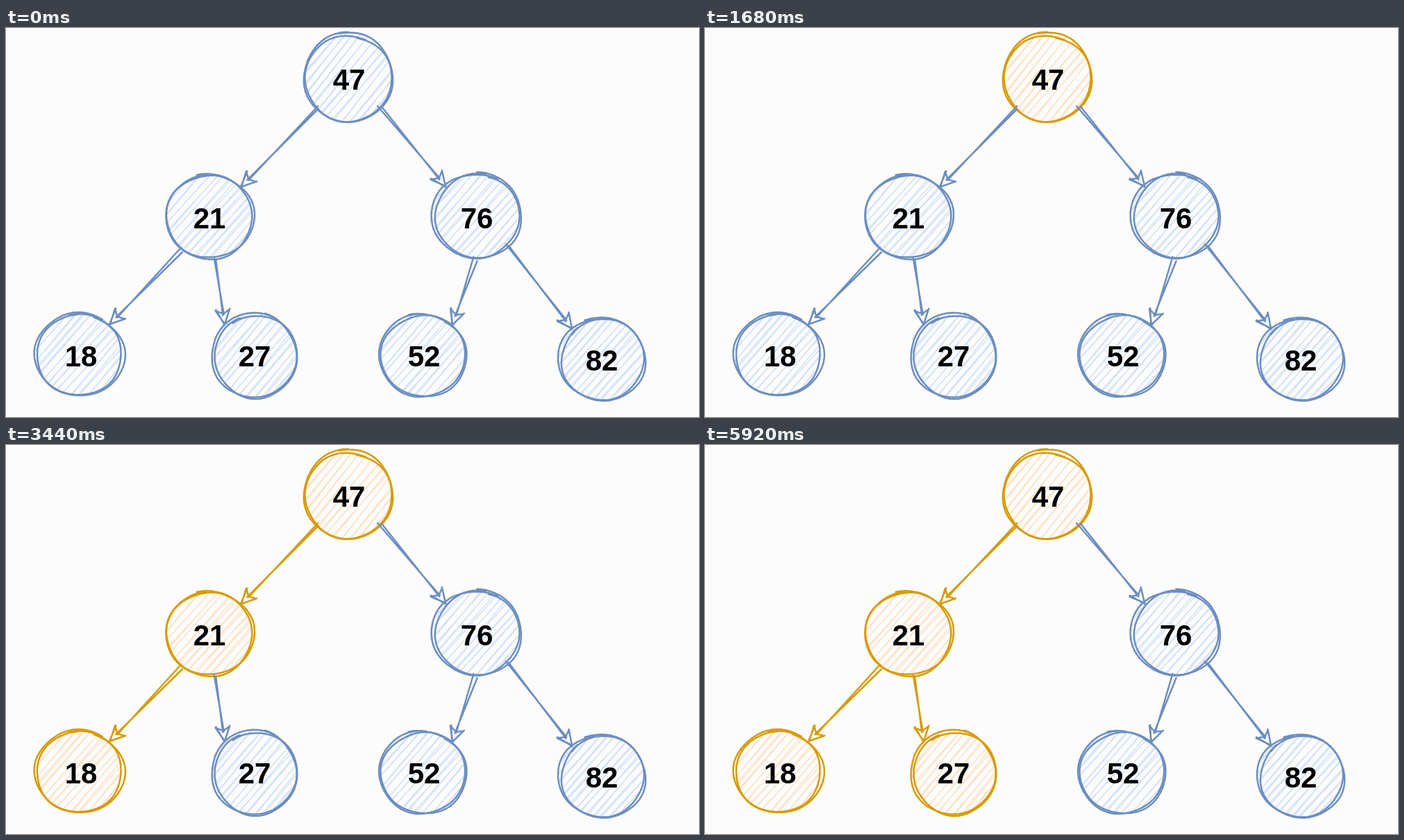
An HTML page that plays this animation: 998 px wide and 561 px high, repeating every 5.94 s.

```html
<!DOCTYPE html>
<html lang="en">
<head>
<meta charset="utf-8">
<title>Tree traversal</title>
<style>
  html, body { margin: 0; width: 100%; height: 100%; overflow: hidden; background: #fcfcfc; }
  svg { display: block; width: 998px; height: 561px; }
  g { --line: #6c8ebf; --fill: #d3e2f8; }
  g.on { --line: #d79b00; --fill: #ffe2c6; }
  path { fill: none; stroke: var(--line); stroke-width: 2.5; stroke-linecap: round; stroke-linejoin: round; }
  .hatch { stroke: var(--fill); stroke-width: 1.5; }
  text { font: bold 42px "Liberation Sans", Arial, sans-serif; text-anchor: middle; fill: #000; }
</style>
</head>
<body>
<svg id="stage" viewBox="0 0 998 561"></svg>
<script>
const LOOP = 5940;
const NEVER = Infinity;
const AT = { root: 700, left: 1950, leftLeaf: 3180, rightLeaf: 4200 };

// Outline strokes: cx, cy, rx, ry, start angle, radial offset at the start
const nodes = [
  { label: 47, x: 494, y: 74, at: AT.root,
    rings: [[493, 71, 64, 65, -102, -1], [493, 73, 62.5, 62, -78, -1]] },
  { label: 21, x: 293, y: 274, at: AT.left,
    rings: [[294, 271.5, 63.5, 59.5, -107, 2], [292.5, 273, 62, 60.5, -80, 1]] },
  { label: 76, x: 678, y: 274, at: NEVER,
    rings: [[676, 271, 63.5, 60.5, -72, -2], [680.5, 271, 62, 61, -92, 2]] },
  { label: 18, x: 108, y: 473, at: AT.leftLeaf,
    rings: [[104, 470, 62.5, 59.5, -68, -3], [107.5, 472, 63.5, 58.5, -105, 1]] },
  { label: 27, x: 358, y: 473, at: AT.rightLeaf,
    rings: [[357, 472, 61, 61, -75, 1], [360, 474, 59.5, 60, -125, -2]] },
  { label: 52, x: 602, y: 473, at: NEVER,
    rings: [[599, 472, 62, 59.5, -108, 1], [602, 473, 62, 58.5, -60, -2]] },
  { label: 82, x: 858, y: 479, at: NEVER,
    rings: [[857, 477, 62, 59, -112, 2], [860.5, 479, 60.5, 59, -140, -1]] }
];

// from x, y; tip x, y; gap between the two strokes at the start
const edges = [
  { line: [449, 115, 339, 229, 3], at: AT.left },
  { line: [538, 113, 633, 228, 4], at: NEVER },
  { line: [253, 320, 150, 427, 6], at: AT.leftLeaf },
  { line: [301, 333, 315, 427, 2], at: AT.rightLeaf },
  { line: [676, 333, 643, 428, 7], at: NEVER },
  { line: [722, 313, 815, 433, 2], at: NEVER }
];

const stage = document.getElementById("stage");
const parts = [];

function add(parent, tag, attrs = {}) {
  const el = document.createElementNS("http://www.w3.org/2000/svg", tag);
  for (const key in attrs) el.setAttribute(key, attrs[key]);
  return parent.appendChild(el);
}

function group(at) {
  const el = add(stage, "g");
  parts.push({ el, at });
  return el;
}

function random(seed) {
  return () => {
    seed = (seed * 16807) % 2147483647;
    return seed / 2147483647;
  };
}

const polyline = pts => "M" + pts.map(p => p.map(v => v.toFixed(1)).join(" ")).join("L");

function ringPath([cx, cy, rx, ry, start, offset], phase) {
  const pts = [];
  for (let d = 0; d <= 372; d += 6) {
    const a = (start + d) * Math.PI / 180;
    const wobble = 0.7 * Math.sin(3 * a + phase) + 0.5 * Math.sin(5 * a + 2 * phase);
    const r = wobble + offset * Math.max(0, 1 - d / 40);
    pts.push([cx + (rx + r) * Math.cos(a), cy + (ry + r) * Math.sin(a)]);
  }
  return polyline(pts);
}

function hatchPath([cx, cy, rx, ry], rnd) {
  const a = 50 * Math.PI / 180;
  const ux = Math.cos(a), uy = -Math.sin(a);
  const jitter = n => (rnd() - 0.5) * n;
  let d = "";
  for (let s = -0.95; s < 0.97; s += 0.145) {
    const half = Math.sqrt(1 - s * s);
    for (let k = 0; k < 2; k++) {
      const end = dir => {
        const along = dir * half + jitter(0.06), across = s + jitter(0.07);
        return [cx + rx * (ux * along - uy * across), cy + ry * (uy * along + ux * across)];
      };
      d += polyline([end(-1), end(1)]);
    }
  }
  return d;
}

function edgePath([x1, y1, x2, y2, gap]) {
  const len = Math.hypot(x2 - x1, y2 - y1);
  const ux = (x2 - x1) / len, uy = (y2 - y1) / len;
  const point = (back, side) => [x2 - ux * back - uy * side, y2 - uy * back + ux * side];
  const notch = point(15, 0);
  return polyline([point(len + 2, gap / 2), point(14, -0.8)]) +
    polyline([point(len - 2, -gap / 2), point(13, 0.8)]) +
    polyline([notch, point(21, 10.5), point(0, 0), point(20, -10), notch]) +
    polyline([point(22, 9.5), point(-1, 0.5), point(21, -10.5)]);
}

nodes.forEach((node, i) => {
  const g = group(node.at);
  add(g, "path", { class: "hatch", d: hatchPath(node.rings[0], random(4177 * (i + 3))) });
  node.rings.forEach((ring, k) => add(g, "path", { d: ringPath(ring, i * 1.7 + k * 2.4) }));
  add(g, "text", { x: node.x, y: node.y + 15 }).textContent = node.label;
});

for (const edge of edges) add(group(edge.at), "path", { d: edgePath(edge.line), "stroke-width": 2 });

const begin = performance.now();
function tick() {
  const t = (performance.now() - begin) % LOOP;
  for (const { el, at } of parts) el.classList.toggle("on", t >= at);
  requestAnimationFrame(tick);
}
tick();
</script>
</body>
</html>
```
